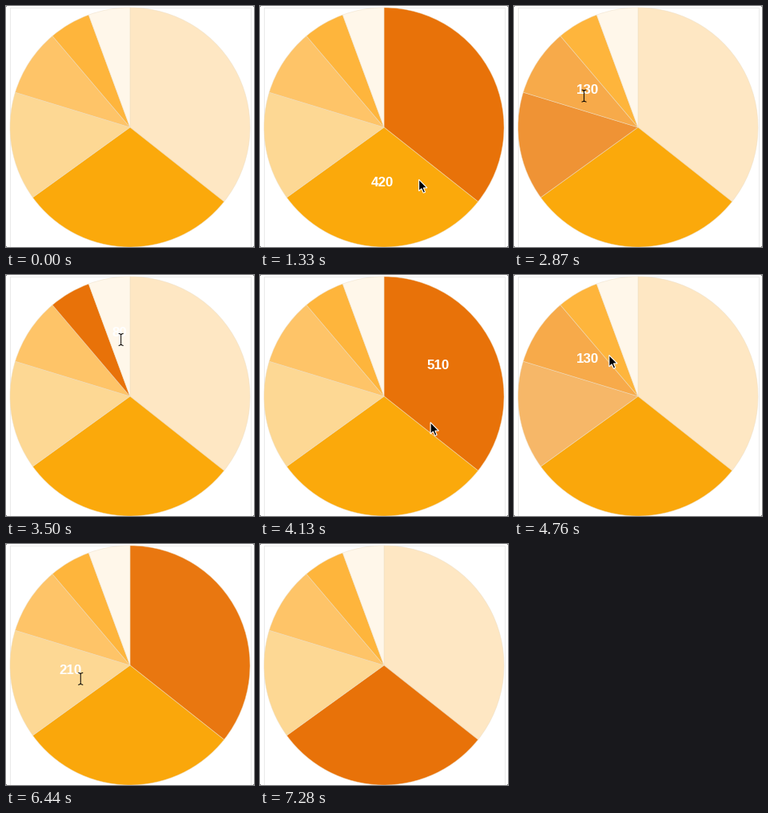
Recreate the animation shown at these times as a matplotlib script. Size 310 by 302 pixels, loop 7350 ms.

```python
import numpy as np
import matplotlib.pyplot as plt
from matplotlib.animation import FuncAnimation
from matplotlib.colors import to_rgb
from matplotlib.patches import Polygon, Rectangle, Wedge

W, H, DPI = 310, 302, 100
FRAMES, STEP_MS = 105, 70
CX, CY, R = 155, 152, 150
PX = 72 / DPI  # one pixel in points

VALUES = [510, 420, 210, 130, 80, 80]
COLORS = ["#fee7c3", "#fba90b", "#fdd894", "#fec468", "#feb53c", "#fff7ea"]
HOVER = np.array(to_rgb("#e87209"))
FADE = 0.32  # colour change per frame

# The pointer circles the pie: frame, clockwise degrees from the top, radius
SWEEP = np.array([
    (9, 60, 190), (13, 66, 80), (26, 240, 77), (32, 251.8, 77),
    (48, 338, 79), (50, 351, 72), (54, 366, 75), (63, 570, 60),
    (66, 660, 65), (68, 685, 63), (76, 765, 45), (82, 560.6, 26),
    (90, 450, 50), (91, 606, 68), (92, 614.7, 64), (102, 545, 140),
    (104, 540, 190),
])
ARROW = np.array([(0, 0), (0, 14.5), (3.3, 11.4), (5.6, 16.8),
                  (8, 15.8), (5.7, 10.5), (10.3, 10.5)])

edges = np.concatenate([[0], np.cumsum(VALUES)]) * 360 / sum(VALUES)
mids = (edges[:-1] + edges[1:]) / 2
base = np.array([to_rgb(c) for c in COLORS])


def on_pie(angle, radius):
    """Stage position of a point given clockwise from the top."""
    a = np.radians(angle)
    return CX + radius * np.sin(a), CY - radius * np.cos(a)


def pointer(i):
    """Angle and radius of the pointer."""
    return [np.interp(i, SWEEP[:, 0], SWEEP[:, k]) for k in (1, 2)]


def slice_at(angle, radius):
    """Index of the slice under a point, or -1 outside the pie."""
    if radius > R:
        return -1
    return int(np.searchsorted(edges, angle % 360, side="right")) - 1


def beam_path(half_w, half_h):
    """Text pointer: a stem with a notched serif at each end."""
    gap, inner = np.nan, half_h - 1
    x = [-half_w, 0, half_w, gap, 0, 0, gap, -half_w, 0, half_w]
    y = [-half_h, -inner, -half_h, gap, -inner, inner, gap,
         half_h, inner, half_h]
    return np.array([x, y])


# The label trails the pointer by one frame, the colour by two.
hovered = [-1] + [slice_at(*pointer(i)) for i in range(FRAMES - 1)]
levels = np.zeros((FRAMES, len(VALUES)))
for i in range(1, FRAMES):
    change = np.where(np.arange(len(VALUES)) == hovered[i - 1], FADE, -FADE)
    levels[i] = np.clip(levels[i - 1] + change, 0, 1)

fig = plt.figure(figsize=(W / DPI, H / DPI), dpi=DPI, facecolor="white")
ax = fig.add_axes([0, 0, 1, 1])
ax.set_xlim(0, W)
ax.set_ylim(H, 0)
ax.axis("off")

ax.add_patch(Rectangle((4.5, 1.5), 301, 305, fill=False, ec="#eaeaea", lw=PX))
for x in (0, W - 1):
    for y in (0, H - 1):
        ax.add_patch(Rectangle((x, y), 1, 1, fc="#777777", lw=0))

wedges = [ax.add_patch(Wedge((CX, CY), R, a - 90, b - 90, fc=c, lw=0.8 * PX,
                             ec=(0.93, 0.87, 0.77, 0.55)))
          for a, b, c in zip(edges[:-1], edges[1:], COLORS)]
label_x, label_y = on_pie(mids, R / 2)
label_y = label_y - 1
labels = [ax.text(x, y, str(v), color="white", ha="center", va="baseline",
                  family="Liberation Sans", weight="bold", size=17 * PX)
          for x, y, v in zip(label_x, label_y, VALUES)]
arrow = ax.add_patch(Polygon(ARROW, fc="black", ec="white", lw=1.1 * PX,
                             joinstyle="miter", zorder=5))
BEAM = beam_path(2.5, 7.5)
beam, = ax.plot([], [], color="black", lw=PX, zorder=6)


def draw(i):
    for k, wedge in enumerate(wedges):
        wedge.set_facecolor(base[k] + (HOVER - base[k]) * levels[i, k])
        labels[k].set_visible(k == hovered[i])

    x, y = on_pie(*pointer(i))
    k = hovered[i]
    on_text = (k >= 0 and abs(x - label_x[k]) < 16
               and abs(y - label_y[k] + 6) < 13)
    arrow.set_visible(not on_text)
    arrow.set_xy(ARROW + (x, y))
    beam.set_visible(on_text)
    beam.set_data(BEAM[0] + x, BEAM[1] + y)
    return [*wedges, *labels, arrow, beam]


anim = FuncAnimation(fig, draw, frames=FRAMES, interval=STEP_MS, repeat=True)
plt.show()
```
